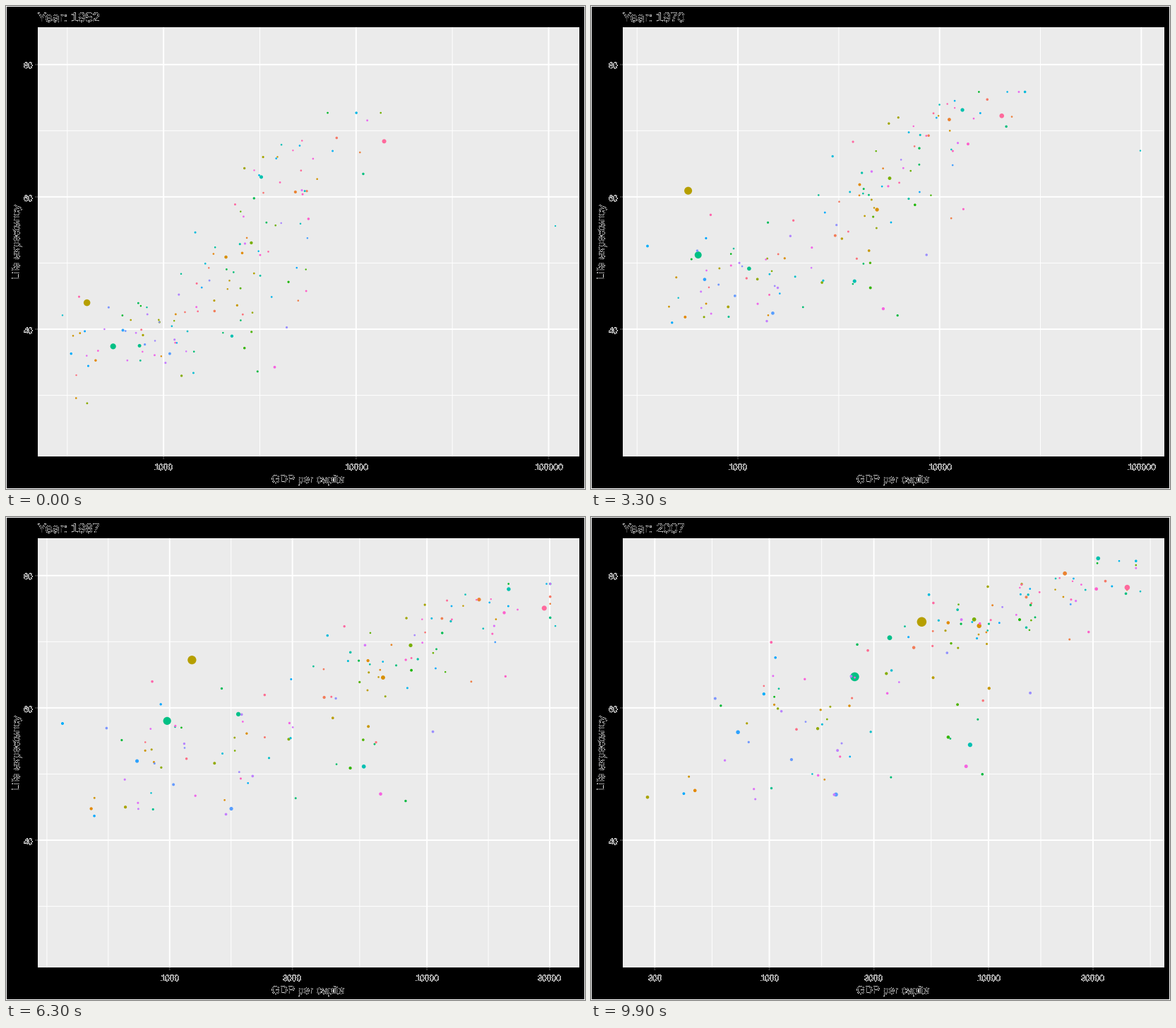
Write a matplotlib script that moves like this. It is 820 px wide and 683 px high and loops after 10 s.

```python
import numpy as np
import matplotlib.pyplot as plt
from matplotlib.animation import FuncAnimation
from matplotlib.collections import LineCollection
from matplotlib.patches import Rectangle

W, H, DPI = 820, 683, 64
PT = 72 / DPI                      # points per pixel
FRAMES, COLORS = 100, 142
LEFT, RIGHT, TOP, BOTTOM = 45, 812, 30, 637
X_MIN, X_MAX = 80, 778             # where the poorest and richest dots sit

T = np.linspace(0, 1, FRAMES)
YEAR = 1952 + 55 * T

plt.rcParams.update({"font.family": "Liberation Sans", "text.hinting": "none"})
rng = np.random.default_rng(11)

# hue slot, population (millions), income, bend, life expectancy, bend
LEADERS = [
    (24, (556, 1319), (400, 4959), 1.8, (44, 73), .49),
    (58, (372, 1110), (547, 2452), 2.1, (37.4, 64.7), .62),
    (134, (158, 301), (13990, 42952), 1, (68.4, 78.2), .85),
    (59, (82, 224), (750, 3541), 1.2, (37.5, 70.6), .95),
    (14, (57, 190), (2109, 9066), .5, (50.9, 72.4), 1),
    (66, (86, 127), (3217, 31656), .45, (63, 82.6), .6),
    (94, (33, 135), (1077, 2014), .6, (36.3, 46.9), .5),
    (107, (2.5, 8.9), (493, 863), .6, (40, 46.2), .6),
    (18, (4.7, 14), (368, 1714), 1.5, (39.4, 59.7), .8),
]
DIPS = {24: (1962, 12), 107: (1992, 22), 18: (1977, 19)}   # slot: year, depth

# richest and poorest dots, which set the income axis: (year, log income) points
EDGES = [
    (71, (.2, 2.5), (55.6, 77.6), .6,
     [(1952, 5.035), (1957, 5.055), (1967, 4.908), (1972, 5.039), (1982, 4.527),
      (1987, 4.499), (2007, 4.693)]),
    (87, (20, 48), (36.3, 62.1), .42,
     [(1952, 2.52), (1962, 2.589), (1967, 2.543), (1977, 2.569), (1982, 2.627),
      (1992, 2.54), (2007, 2.975)]),
    (27, (14, 64), (39.1, 46.5), .5,
     [(1952, 2.893), (1972, 2.957), (1987, 2.828), (2002, 2.382), (2007, 2.444)]),
    (73, (.7, 2), (42.1, 50), 1, [(1952, 2.475), (1957, 2.526), (2007, 3.196)]),
    (17, (2.4, 8.4), (39, 49.6), .8,
     [(1952, 2.53), (1962, 2.55), (1977, 2.745), (2007, 2.633)]),
]

# count, growth, correlation, then start/end of
# log income mean, its spread, life mean, its spread
CROWDS = [
    (43, 3.5, .5, (3.0, 3.25), (.22, .4), (39.3, 55), (4.5, 8)),
    (25, 3.3, .75, (3.25, 3.84), (.38, .46), (47, 71.8), (8, 5)),
    (23, 2.8, .7, (3.47, 3.9), (.22, .23), (53, 73.6), (8.5, 3.6)),
    (31, 1.3, .8, (3.7, 4.34), (.25, .22), (64.5, 77.6), (6, 2.8)),
    (6, 3, .5, (3.62, 4.08), (.15, .22), (39, 59), (5, 9)),
]


def ease(ends, power=1):
    return ends[0] + (ends[1] - ends[0]) * T ** power


def wander(size):
    """Small random walk over twelve evenly spaced knots."""
    return np.interp(T, np.linspace(0, 1, 12), rng.normal(0, size, 12))


def diameter(pop):
    return 2.1 + 11.4 * np.sqrt(ease(pop) / 1318)


def dip(slot):
    year, depth = DIPS.get(slot, (0, 0))
    return depth * np.maximum(0, 1 - np.abs(YEAR - year) / 5)


def hue_color(slot):
    """Evenly spaced hues at luminance 65, chroma 100 (polar LUV)."""
    h, lum = np.radians(15 + 360 * slot / COLORS), 65
    u = 100 * np.cos(h) / (13 * lum) + .19784
    v = 100 * np.sin(h) / (13 * lum) + .46834
    y = ((lum + 16) / 116) ** 3
    x = 9 * y * u / (4 * v)
    z = -x / 3 - 5 * y + 3 * y / v
    lin = np.array([[3.2405, -1.5371, -.4985],
                    [-.9693, 1.8760, .0416],
                    [.0556, -.2040, 1.0572]]) @ (x, y, z)
    lin = np.clip(lin, 0, 1)
    return np.where(lin <= .00304, 12.92 * lin, 1.055 * lin ** (1 / 2.4) - .055)


def make_dots():
    dots = [(slot, np.interp(YEAR, *zip(*points)), ease(life, bend), diameter(pop))
            for slot, pop, life, bend, points in EDGES]
    lo = np.min([d[1] for d in dots], axis=0)
    hi = np.max([d[1] for d in dots], axis=0)

    def add(slot, gdp, life, pop):
        dots.append((slot, np.clip(gdp, lo + .02, hi - .02), life, diameter(pop)))

    for slot, pop, gdp, gdp_bend, life, life_bend in LEADERS:
        add(slot, ease(np.log10(gdp), gdp_bend), ease(life, life_bend) - dip(slot), pop)

    taken = {d[0] for d in dots}
    free = list(rng.permutation([s for s in range(COLORS) if s not in taken]))
    for count, growth, rho, g_mean, g_sd, l_mean, l_sd in CROWDS:
        for _ in range(count):
            a, b = np.clip(rng.normal(size=2), -1.8, 1.8)
            b = rho * a + np.sqrt(1 - rho ** 2) * b
            gdp = ease(g_mean, .55) + a * ease(g_sd) + wander(.03)
            life = ease(l_mean, .65) + b * ease(l_sd) + wander(.4)
            life = np.clip(life, ease((28.8, 40)), ease((72.7, 82.2)))
            pop = np.clip(np.exp(rng.normal(1.6, 1)), .1, 50)
            add(free.pop(), gdp, life, (pop, pop * growth))

    dots.sort(key=lambda d: d[0])
    slots, gdp, life, size = zip(*dots)
    return ([hue_color(s) for s in slots], np.array(gdp), np.array(life),
            np.array(size), lo, hi)


def y_px(life):
    return 82.8 + (80 - life) * 9.355


def x_breaks(lo, hi):
    """Major and minor breaks (log10) inside the expanded limits."""
    major = np.arange(2.0, 7)
    major = major[(major >= lo) & (major <= hi)]
    if len(major) < 3:
        major = np.array([e + np.log10(m) for e in range(2, 6) for m in (1, 3)])
        major = major[(major >= lo) & (major <= hi)]
    step = major[1] - major[0]
    ends = np.r_[major[0] - step, major, major[-1] + step]
    minor = np.r_[(ends[1:] + ends[:-1]) / 2, ends[0], ends[-1]]
    return major, minor[(minor >= lo) & (minor <= hi)]


def fringe(im, dpi):
    """Text as on white paper, with the pure white pixels knocked out."""
    a = im[..., 3:]
    return np.concatenate([1 - a * (1 - im[..., :3]), (a > .04) * 1.0], axis=2), 0, 0


def stage():
    ax = fig.add_axes([0, 0, 1, 1])
    ax.set_xlim(0, W)
    ax.set_ylim(H, 0)
    ax.axis("off")
    return ax


def box(x0, y0, x1, y1, color):
    ax.add_patch(Rectangle((x0, y0), x1 - x0, y1 - y0, fc=color, lw=0))


def lines(width, color, segments=()):
    art = LineCollection(segments, linewidths=width * PT, colors=color, zorder=2,
                         capstyle="butt", snap=False)
    return ax.add_collection(art, autolim=False)


def label(x, y, s, px, color="black", **kw):
    return ink.text(x, y, s, fontsize=px * PT, color=color, va="baseline", **kw)


def rows(values, x0=LEFT, x1=RIGHT):
    return [[(x0, y_px(v)), (x1, y_px(v))] for v in values]


def columns(xs, y0=TOP, y1=BOTTOM):
    return [[(x, y0), (x, y1)] for x in xs]


colors, gdp, life, size, lo, hi = make_dots()

fig = plt.figure(figsize=(W / DPI, H / DPI), dpi=DPI, facecolor="white")
ax, ink = stage(), stage()
ink.set_agg_filter(fringe)

box(1, 1, W - 1, H - 1, "black")
box(LEFT, TOP, RIGHT, BOTTOM, "#EBEBEB")
lines(1, "white", rows((70, 50, 30)))
minor_grid = lines(1, "white")
lines(2, "white", rows((80, 60, 40)))
major_grid = lines(2, "white")
lines(2, "#333333", rows((80, 60, 40), LEFT - 4, LEFT))
ticks = lines(2, "#333333")
cloud = ax.scatter(gdp[:, 0], life[:, 0], c=colors, linewidths=0, zorder=3)

title = label(LEFT, 22, "", 18.3)
label((LEFT + RIGHT) / 2, 674, "GDP per capita", 15.3, ha="center")
label(20, (TOP + BOTTOM) / 2, "Life expectancy", 15.3, rotation=90,
      rotation_mode="anchor", ha="center")
for v in (80, 60, 40):
    label(38, y_px(v) + 5.5, str(v), 12.2, "#4D4D4D", ha="right")
tick_labels = [label(0, 656, "", 12.2, "#4D4D4D", ha="center") for _ in range(6)]


def update(i):
    span = hi[i] - lo[i]

    def x_px(v):
        return X_MIN + (v - lo[i]) * (X_MAX - X_MIN) / span

    cloud.set_offsets(np.column_stack([x_px(gdp[:, i]), y_px(life[:, i])]))
    cloud.set_sizes((size[:, i] * PT) ** 2)

    major, minor = x_breaks(lo[i] - .05 * span, hi[i] + .05 * span)
    minor_grid.set_segments(columns(x_px(minor)))
    major_grid.set_segments(columns(x_px(major)))
    ticks.set_segments(columns(x_px(major), BOTTOM, BOTTOM + 4))
    for text in tick_labels:
        text.set_text("")
    for text, v in zip(tick_labels, major):
        text.set_text(str(round(10 ** v)))
        text.set_x(x_px(v))
    title.set_text(f"Year: {round(YEAR[i])}")
    return []


anim = FuncAnimation(fig, update, frames=FRAMES, interval=100, repeat=True,
                     repeat_delay=0)
plt.show()
```
